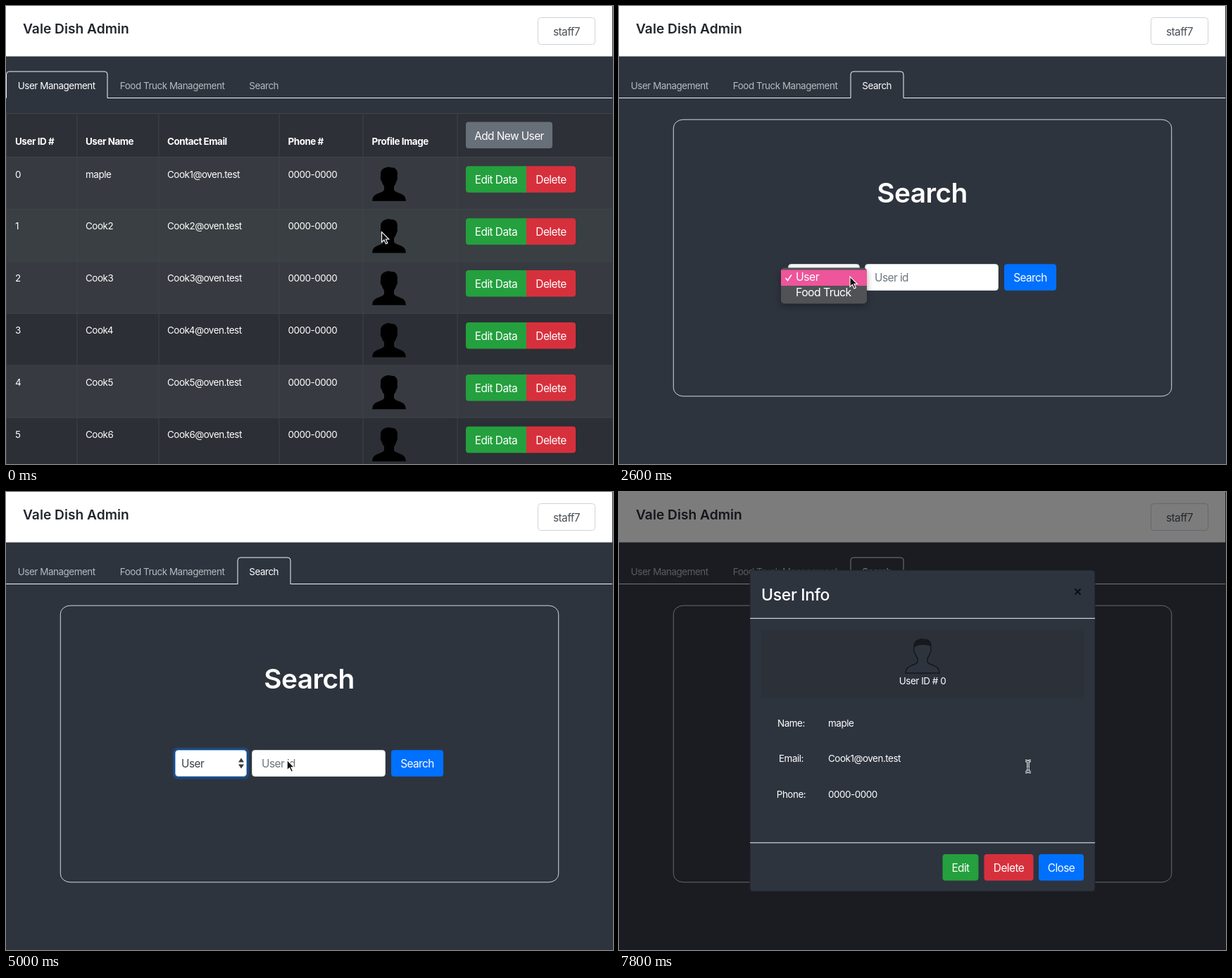
Animation, 862 px wide and 650 px high, one loop 8000 ms. Source, as an HTML page:

```html
<!DOCTYPE html>
<html lang="en">
<head>
<meta charset="utf-8">
<title>Admin panel</title>
<style>
  html, body { margin: 0; width: 100%; height: 100%; overflow: hidden; background: #2e343e; }
  svg { display: block; width: 100vw; height: 100vh; }
  text { font-family: Inter, "Open Sans", sans-serif; white-space: pre; }
  .menu { filter: drop-shadow(0 3px 5px rgba(0, 0, 0, .35)); }
</style>
</head>
<body>
<svg id="stage" viewBox="0 0 862 650"></svg>
<script>
const LOOP = 8000, STEP = 200;
const PAGE = '#2e343e', GREEN = '#24a03e', RED = '#d7303d', BLUE = '#0070ff';
const PHONE = '0000-0000';
const TABS = [
  { label: 'User Management', x: 0, w: 144.5 },
  { label: 'Food Truck Management', x: 145, w: 183 },
  { label: 'Search', x: 328.5, w: 76 },
];
const OPTIONS = ['User', 'Food Truck'];

// Moments of the session, in ms
const AT = {
  searchTab: 1000, openFirst: 2400, pickTruck: 3200, openSecond: 3800,
  pickUser: 4600, focusInput: 5400, typed: 6000, submit: 7200, modal: 7380,
};

// Pointer path: time, x, y, shape
const POINTER = [
  [0, 533.5, 320.5, 'arrow'], [200, 533.5, 320.5, 'arrow'], [1000, 372, 121, 'hand'],
  [1200, 371, 119, 'hand'], [1600, 371, 121, 'arrow'], [2200, 328, 384, 'arrow'],
  [2600, 328, 384, 'arrow'], [3000, 318, 406, 'arrow'], [3200, 318, 406, 'arrow'],
  [3600, 314, 385, 'arrow'], [3800, 313, 383, 'arrow'], [4200, 311, 361, 'arrow'],
  [4600, 311, 361, 'arrow'], [5200, 430, 387, 'beam'], [5800, 430, 387, 'none'],
  [6200, 430, 387, 'beam'], [6800, 581, 389.5, 'beam'], [8000, 581, 389.5, 'beam'],
];

const rect = (x, y, w, h, fill, attrs = '') =>
  `<rect x="${x}" y="${y}" width="${w}" height="${h}" fill="${fill}" ${attrs}/>`;
const path = (d, attrs) => `<path d="${d}" ${attrs}/>`;
const move = (x, y, body) => `<g transform="translate(${x} ${y})">${body}</g>`;

function text(x, y, str, { size = 14, fill = '#fff', weight = 400, anchor = 'start', track = -.035 } = {}) {
  return `<text x="${x}" y="${y}" font-size="${size * .96}" font-weight="${weight}" fill="${fill}"
    text-anchor="${anchor}" letter-spacing="${track}em">${str}</text>`;
}

const centered = (x, y, str, style) => text(x, y, str, { anchor: 'middle', ...style });

const ring = (x, y, w, h) =>
  rect(x - 1.6, y - 1.6, w + 3.2, h + 3.2, 'none',
    'rx="5" stroke="#007bff" stroke-opacity=".3" stroke-width="3.2"');

function button(x, y, w, label, fill) {
  return rect(x, y, w, 37.5, fill, 'rx="4"') +
    centered(x + w / 2, y + 25, label, { size: 16 });
}

function field(x, w, focused) {
  return (focused ? ring(x, 366, w, 38) : '') +
    rect(x + .5, 366.5, w - 1, 37, '#fff', `rx="4" stroke="${focused ? '#80bdff' : '#ced4da'}"`);
}

const BUST = 'M0 49L1 44Q3 40 9 38Q15 36 17 33.5V28Q14.5 25 13.5 21Q11 18 12 14Q11 5 17 2.5' +
  'Q22-.5 27 1.5Q36 1 36 11L35.5 14Q37 17 34.5 21Q33.5 25 31 28V33.5Q33 36 39 38Q45 40 47 44L48 49Z';

function header() {
  return rect(0, 0, 861, 71.5, '#fff') +
    text(24, 38.5, 'Vale Dish Admin', { size: 20, fill: '#23272e', weight: 600, track: 0 }) +
    rect(755.5, 16.5, 81, 38, '#fff', 'rx="4" stroke="#ced4da"') +
    centered(796, 41.5, 'staff7', { size: 16, fill: '#495057' });
}

function tabs(active) {
  const { x, w } = TABS[active];
  const left = x + .5, right = x + w - .5;
  return path(`M0 130.5H${left}V97q0-4 4-4H${right - 4}q4 0 4 4V130.5H861`, 'fill="none" stroke="#f4f5f6"') +
    TABS.map((tab, i) =>
      text(tab.x + 16.8, 117.5, tab.label, { fill: i === active ? '#fff' : '#b6babf' })).join('');
}

function userTable(pointerY) {
  const columns = [13, 113, 229, 400.5, 519.5];
  const titles = ['User ID #', 'User Name', 'Contact Email', 'Phone #', 'Profile Image'];
  const hovered = Math.floor((pointerY - 215) / 74);
  let out = rect(0, 152, 861, 63, '#2d3036') +
    titles.map((title, i) => text(columns[i], 197, title, { weight: 700 })).join('') +
    button(653, 164.5, 123, 'Add New User', '#676f78');
  for (let i = 0; i < 6; i++) {
    const y = 215 + 73.9 * i;
    const fill = i === hovered ? '#393f42' : i % 2 ? '#2c2f35' : '#373a40';
    const cells = [i, i ? `Cook${i + 1}` : 'maple', `Cook${i + 1}@oven.test`, PHONE];
    out += rect(0, y, 861, 74, fill) +
      rect(0, y - 1, 861, 1, '#3f444b') +
      cells.map((cell, c) => text(columns[c], y + 28.5, cell)).join('') +
      move(520, y + 12.7, path(BUST, 'fill="#000"')) +
      button(653, y + 12.3, 86, 'Edit Data', GREEN) +
      button(739, y + 12.3, 70, 'Delete', RED) +
      rect(735, y + 12.3, 4, 37.5, GREEN) + rect(739, y + 12.3, 4, 37.5, RED);
  }
  return out + path('M0 152.5H861M.5 152V650M101 152V650M217 152V650M388 152V650M507 152V650M641 152V650',
    'fill="none" stroke="#3f444b"');
}

function menu(selected, pointerY) {
  const top = selected ? 350 : 371.5;
  const hovered = pointerY > top + 25 ? 1 : 0;
  return `<g class="menu">${rect(230, top, 122, 51, '#505256', 'rx="5"')}</g>` +
    rect(230, top + 3 + 22 * hovered, 122, 22.5, '#ee559a') +
    OPTIONS.map((label, i) => text(251, top + 18.5 + 22 * i, label, { size: 16.5 })).join('') +
    path(`M236.5 ${top + 14.5 + 22 * selected}l3 3.5 5.5-8`, 'fill="none" stroke="#fff" stroke-width="1.6"');
}

function spinner() {
  return rect(516.5, 378.5, 7, 13, '#f4f4f4', 'rx="3.5" stroke="#bbb" stroke-width=".7"') +
    path('M518.3 383.5l1.7-2 1.7 2M518.3 386.5l1.7 2 1.7-2', 'fill="none" stroke="#444"');
}

function searchPage(t, pointerY) {
  const between = (from, to) => t >= from && t < to;
  const selected = between(AT.pickTruck, AT.pickUser) ? 1 : 0;
  const menuOpen = between(AT.openFirst, AT.pickTruck) || between(AT.openSecond, AT.pickUser);
  const inputFocused = between(AT.focusInput, AT.submit);
  const hasText = t >= AT.typed;
  const submitted = t >= AT.submit;
  const dark = { size: 16, fill: '#3b4148' };
  const caretX = hasText ? 372.5 : 363;
  return rect(77.3, 161.2, 707.4, 392.6, 'none', 'rx="14" ry="12" stroke="#d5d7d9"') +
    centered(430.5, 279, 'Search', { size: 40.5, weight: 600, track: -.015 }) +
    field(240, 102, between(AT.pickTruck, AT.focusInput)) +
    text(249, 391, OPTIONS[selected], dark) +
    path('M330 383.5l4-6 4 6ZM330 386.5l4 6 4-6Z', 'fill="#343a40"') +
    field(349, 190, inputFocused) +
    text(363, 391, hasText ? '0' : ['User id', 'Food Truck Id'][selected],
      hasText ? dark : { size: 16, fill: '#6c757d' }) +
    (inputFocused ? rect(caretX - .5, 377, 1, 17, '#111') + spinner() : '') +
    (submitted ? ring(547, 366, 74, 38) : '') +
    button(547, 366.3, 74, 'Search', submitted ? '#005fcc' : BLUE) +
    (menuOpen ? menu(selected, pointerY) : '');
}

// Numeric solution of CSS ease-out: cubic-bezier(0, 0, .58, 1)
function easeOut(p) {
  let lo = 0, hi = 1;
  for (let i = 0; i < 20; i++) {
    const s = (lo + hi) / 2;
    if (1.74 * s * s * (1 - s) + s ** 3 < p) lo = s; else hi = s;
  }
  return lo * lo * (3 - 2 * lo);
}

function modal(elapsed) {
  if (elapsed < 0) return '';
  const fade = Math.min(1, elapsed / 150);
  const drop = -50 * (1 - easeOut(Math.min(1, elapsed / 300)));
  const details = [['Name:', 'maple'], ['Email:', 'Cook1@oven.test'], ['Phone:', PHONE]];
  const avatar = path(BUST, `fill="${PAGE}" stroke="#14171b" stroke-width="1.4"`) +
    path('M12.5 12Q11 5 17 2.5Q22-.5 27 1.5Q36 1 36 11Q24 6 12.5 12Z', 'fill="#16191d"');
  const body = rect(186, 111, 490, 456, PAGE, 'rx="4" stroke="#1d2025"') +
    rect(186, 178.8, 490, 1, '#f1f2f3') + rect(186, 497.3, 490, 1, '#f1f2f3') +
    text(202, 154, 'User Info', { size: 24, weight: 500, track: -.015 }) +
    path('M647.5 137.5l8 8m0-8l-8 8', 'stroke="#0c0e10" stroke-width="2"') +
    rect(202, 195, 458, 98, '#2c3139') +
    move(407, 208, avatar) +
    centered(431, 273, 'User ID # 0') +
    details.map(([label, value], i) =>
      centered(244.5, 333 + 50.3 * i, label) + text(297, 333 + 50.3 * i, value)).join('') +
    button(459.5, 514, 51, 'Edit', GREEN) +
    button(518.5, 514, 70, 'Delete', RED) +
    button(596, 514, 64, 'Close', BLUE);
  return rect(0, 0, 862, 650, '#080808', `opacity="${fade * .53}"`) +
    `<g opacity="${fade}">${move(0, drop, body)}</g>`;
}

const SHAPES = {
  none: '',
  arrow: path('M0 0V14.5L3.4 11.4 6 17 8.4 16 5.9 10.5H10.3Z', 'fill="#111" stroke="#fff" stroke-width="1.1"'),
  hand: path('M0 1.2Q1.2-.8 2.3 1.2L3.6 5Q5 4 6 5.6Q7.4 5 8 6.5Q9.6 6 9.7 8L8.8 13.5H2.2L-3 8.5Q-2.7 6.3-.4 7.6L1 8.5Z',
    'fill="#fff" stroke="#111" stroke-width=".9"') +
    path('M3.6 8.5V12M5.5 8.5V12M7.3 8.5V12', 'stroke="#222" stroke-width=".7"'),
  beam: ['stroke="#fff" stroke-width="3.4"', 'stroke="#23272d" stroke-width="1.2"'].map(stroke =>
    path('M-3.8-8Q0-8 0-6Q0-8 3.8-8M0-6V6M-3.8 8Q0 8 0 6Q0 8 3.8 8M-2 2.5H2',
      `fill="none" ${stroke}`)).join(''),
};

function pointerAt(t) {
  const next = POINTER.findIndex(key => key[0] > t);
  const [t0, x0, y0, shape] = POINTER[next - 1];
  const [t1, x1, y1] = POINTER[next];
  const p = (t - t0) / (t1 - t0), k = p * p * (3 - 2 * p);
  return { x: x0 + (x1 - x0) * k, y: y0 + (y1 - y0) * k, shape };
}

function scene(t) {
  const pointer = pointerAt(t);
  const searching = t >= AT.searchTab;
  return rect(0, 0, 862, 650, PAGE) + header() + tabs(searching ? 2 : 0) +
    (searching ? searchPage(t, pointer.y) : userTable(pointer.y)) +
    modal(t - AT.modal) +
    move(pointer.x, pointer.y, SHAPES[pointer.shape]);
}

const stage = document.getElementById('stage');
let shown = -1;

function tick() {
  const t = Math.floor(performance.now() % LOOP / STEP) * STEP;
  if (t !== shown) stage.innerHTML = scene(shown = t);
  requestAnimationFrame(tick);
}
tick();
</script>
</body>
</html>
```
